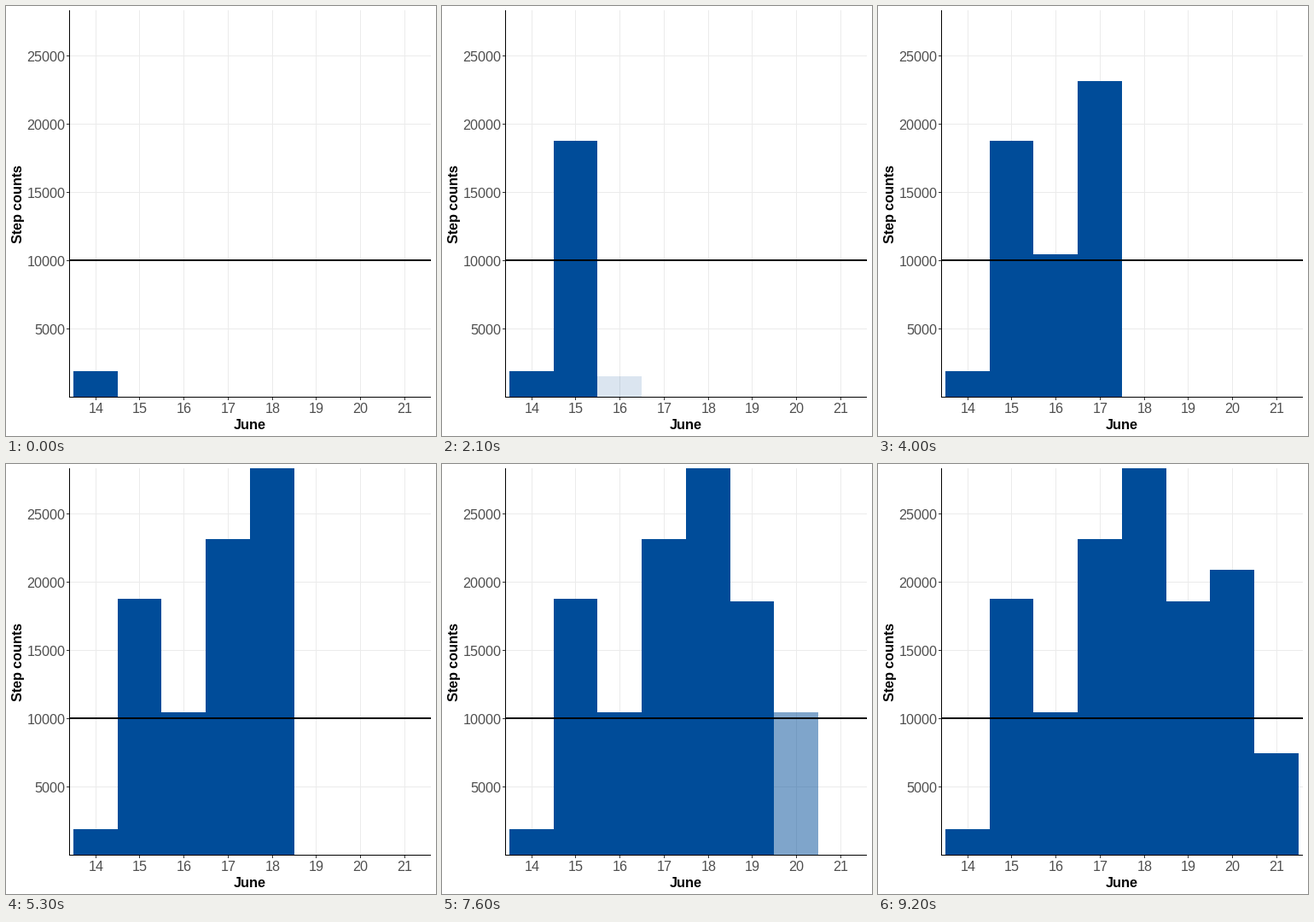
A matplotlib script that plays this animation: 504 px wide and 504 px high, repeating every 10 s.

```python
import matplotlib.pyplot as plt
from matplotlib.animation import FuncAnimation
from matplotlib.patches import Rectangle

SIZE, DPI = 504, 96
STEP_MS, FRAMES = 100, 100
LEFT, TOP, RIGHT, BASE = 75, 5, 498, 458
BLUE, GRID, TICK, LABEL = "#004c99", "#ebebeb", "#333333", "#4d4d4d"

# bar top in pixels, first step of its entrance, number of steps
BARS = [(428, -1, 1), (158, 7, 7), (291, 21, 7), (88, 35, 6),
        (5, 48, 6), (161, 61, 6), (124, 74, 6), (339, 87, 6)]

plt.rcParams.update({
    "font.family": "Liberation Sans",
    "font.size": 12,
    "text.hinting": "default",
    "text.hinting_factor": 1,
})

fig = plt.figure(figsize=(SIZE / DPI, SIZE / DPI), dpi=DPI, facecolor="white")
ax = fig.add_axes([0, 0, 1, 1])
ax.set_xlim(0, SIZE)
ax.set_ylim(SIZE, 0)
ax.axis("off")


def box(x0, y0, x1, y1, color, z):
    patch = Rectangle((x0, y0), x1 - x0, y1 - y0, facecolor=color,
                      linewidth=0, antialiased=False, zorder=z)
    return ax.add_patch(patch)


def edge(i):
    return round(78.9 + 51.75 * i)


# horizontal grid, ticks and labels
for k in range(1, 6):
    y = BASE - 80 * k
    box(LEFT, y, RIGHT, y + 1, GRID, 1)
    box(71, y, 74, y + 1, TICK, 4)
    ax.text(69.5, y + 7, str(5000 * k), color=LABEL, ha="right", va="baseline")

# vertical grid, ticks and labels
for i in range(len(BARS)):
    x = int(105 + 51.75 * i)
    box(x, TOP, x + 1, BASE, GRID, 1)
    box(x, BASE + 1, x + 1, BASE + 4, TICK, 4)
    ax.text(x + 0.5, 477, str(14 + i), color=LABEL, ha="center", va="baseline")

# goal line and axes
box(LEFT, 297, RIGHT, 299, "black", 3)
box(74, TOP, 75, BASE + 1, "black", 5)
box(74, BASE, RIGHT, BASE + 1, "black", 5)

ax.text(286, 496, "June", weight="bold", ha="center", va="baseline")
ax.text(19, 231.5, "Step counts", weight="bold", rotation=90,
        rotation_mode="anchor", ha="center", va="baseline")

bars = [box(edge(i), BASE, edge(i + 1), BASE, BLUE, 2)
        for i in range(len(BARS))]


def update(frame):
    for bar, (top, start, steps) in zip(bars, BARS):
        p = min(max((frame - start + 1) / steps, 0), 1)
        height = round((BASE - top) * p)
        bar.set_y(BASE - height)
        bar.set_height(height)
        bar.set_alpha(p)
        bar.set_visible(p > 0)
    return bars


anim = FuncAnimation(fig, update, frames=FRAMES, interval=STEP_MS,
                     repeat=True, repeat_delay=0, blit=False)
plt.show()
```
